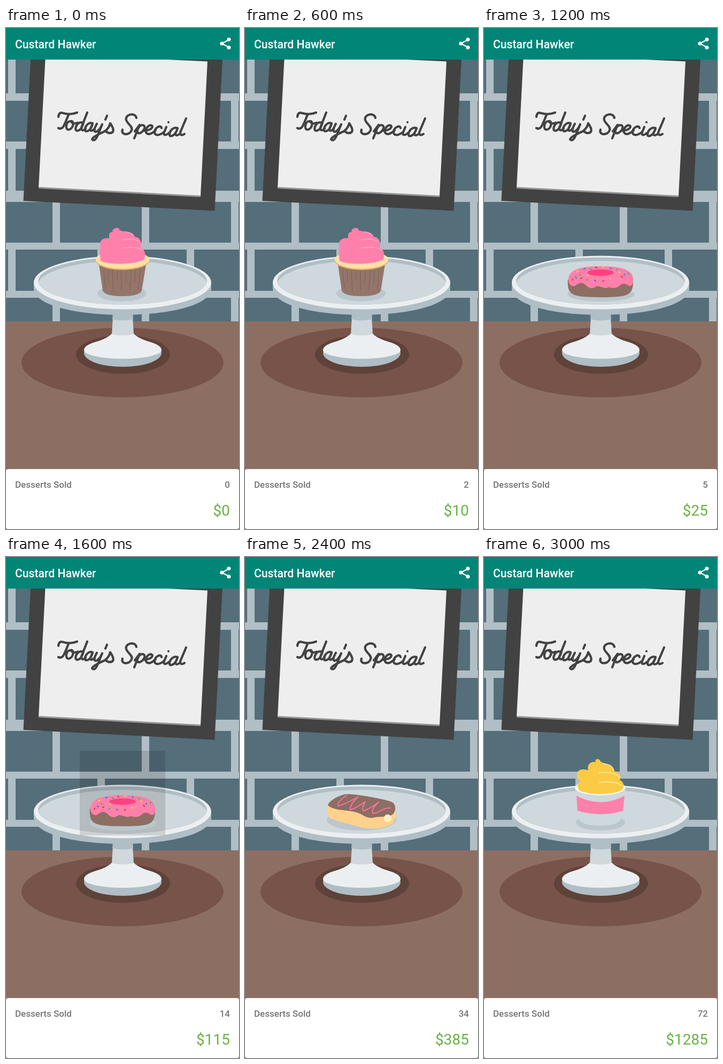
Recreate the animation shown at these times as an HTML page. Size 436 px wide and 936 px high, loop 3200 ms.

```html
<!DOCTYPE html>
<html lang="en">
<head>
<meta charset="utf-8">
<title>Dessert counter</title>
<style>
  html, body { margin: 0; width: 100%; height: 100%; overflow: hidden; }
  svg { display: block; width: 436px; height: 936px; font-family: Roboto, sans-serif; }
  .line { fill: none; stroke-linecap: round; stroke-linejoin: round; }
  .shadow { fill: #bac7cd; }
  .end { text-anchor: end; }
</style>
</head>
<body>
<svg viewBox="0 0 436 936">
  <!-- wall -->
  <path fill="#546e7a" d="M0 59h436v489H0z"/>
  <g id="mortar" fill="#b0bec5"></g>

  <!-- sign -->
  <path fill="#424242" d="M46 59H405L390.500 341.500 32.500 323z"/>
  <path fill="#eee" d="M73.500 59H302L377 62.500 364 315 61 299z"/>
  <path class="line" stroke="#949494" stroke-width="3" d="M62.500 298.500 363 314.500"/>
  <g role="img" aria-label="Today's Special" class="line" stroke="#424242" stroke-width="4.200">
    <path d="M98 166Q99 156 107 159Q120 163 133 158M117 162Q112 175 108 183Q104 190 98 187"/>
    <path d="M121 174C112 174 110 190 117 190C126 189 129 173 121 174Q126 181 134 177"/>
    <path d="M144 177C133 173 126 191 133 192C139 192 143 184 145 177M152 158L141 186Q141 195 149 188"/>
    <path d="M162 178C151 174 144 192 150 193C156 193 160 186 162 179L158 188Q158 196 166 188"/>
    <path d="M170 179Q162 193 168 194Q175 192 180 180L171 202Q166 213 161 208Q162 203 185 193"/>
    <path d="M189 164L186 171M185 193Q193 187 195 178Q204 191 199 195Q193 198 188 194"/>
    <path d="M244 168C242 157 222 161 225 172C227 179 238 184 235 191C232 201 214 201 218 190"/>
    <path d="M241 193L250 181L240 206M247 187C254 177 263 182 258 190C253 197 247 199 245 193"/>
    <path d="M257 192Q273 191 274 184C271 177 259 187 262 195C266 202 275 196 280 191"/>
    <path d="M291 187C290 180 278 186 278 195C279 203 289 200 296 194"/>
    <path d="M300 185L295 197Q297 203 305 196M304 176v.1"/>
    <path d="M321 187C310 183 302 200 308 202C314 202 319 195 321 188L317 197Q318 204 326 197"/>
    <path d="M337 169L326 195Q326 203 334 198"/>
  </g>

  <!-- table and stand -->
  <path fill="#8d6e63" d="M0 548h436v388H0z"/>
  <ellipse cx="218" cy="625" rx="189" ry="65" fill="#775349"/>
  <ellipse cx="219" cy="610" rx="88" ry="36" fill="#5f4239"/>
  <ellipse cx="218.500" cy="607" rx="72.500" ry="26" fill="#b0bec5"/>
  <path fill="#eceff1" d="M198 571Q190 580 166 587Q146 593 146 602A72.500 16 0 0 0 291 602Q291 593 271 587Q247 580 239 571z"/>
  <path fill="#cfd8dc" d="M201 525H236L239 572Q218 577 198 572z"/>
  <path fill="#b0bec5" d="M200 530H237L238 544Q218 549 199 544z"/>
  <path fill="#b0bec5" d="M52 476v12C58 552 378 552 384 488v-12z"/>
  <ellipse cx="218" cy="475.500" rx="166" ry="50" fill="#eceff1"/>
  <clipPath id="dish"><ellipse cx="218" cy="472.500" rx="158" ry="44"/></clipPath>
  <g clip-path="url(#dish)">
    <path fill="#b0bec5" d="M50 420h336v110H50z"/>
    <ellipse cx="218" cy="481" rx="159" ry="46" fill="#cfd8dc"/>
  </g>

  <path id="ripple" fill-opacity=".13" d="M138 362h160v158H138z"/>

  <g class="dessert">
    <ellipse class="shadow" cx="217" cy="496" rx="46" ry="15"/>
    <path fill="#93756a" d="M174 442L181 491Q186 501 217 501Q249 501 254 491L262 442z"/>
    <path class="line" stroke="#7d5f55" d="M183 452l3 34M191 453l1 20M199 453l2 40M208 454v17M216 454v36M225 454l-1 20M234 454l-2 37M242 453l-1 22M251 452l-3 35"/>
    <ellipse cx="218" cy="435" rx="50" ry="17" fill="#e5b779"/>
    <ellipse cx="218" cy="432.500" rx="50" ry="17" fill="#ffe0a3"/>
    <path fill="#ff80ab" d="M176 425C174 413 177 412 177 408C173 397 183 391 193 393C192 382 196 381 200 381C196 375 212 370 212 377C218 382 238 378 241 390C252 391 255 402 251 409C262 415 261 425 259 431C250 443 190 443 177 435z"/>
    <path class="line" stroke="#ffbdd2" d="M222 381Q234 380 238 389M217 396Q241 391 250 400M219 411Q245 407 256 415"/>
  </g>

  <g class="dessert">
    <ellipse class="shadow" cx="219" cy="497" rx="63" ry="14"/>
    <path fill="#8d6e63" d="M157 470C155 500 165 503 218 503C270 503 280 500 279 470z"/>
    <path fill="#ff80ab" d="M158 470C158 450 185 445 218 445C252 445 278 450 279 468C280 480 275 484 270 481C264 476 258 477 253 482C247 487 240 486 234 484C225 488 218 482 211 482C204 488 197 487 191 481C182 472 176 478 170 482C162 483 158 478 158 470z"/>
    <ellipse cx="218" cy="457" rx="25" ry="6" fill="#ff4081"/>
    <g class="line" stroke-width="2.200">
      <path stroke="#3d7fd6" d="M171 465l2 2M187 450l2-1M207 471l2 2M236 448l2 2M262 462l1-2"/>
      <path stroke="#ffd54f" d="M174 455l2-1M194 461l1 2M222 447h2M235 467l2 2M252 456l2 1"/>
      <path stroke="#e53935" d="M165 471l1-2M181 468l2-1M209 447l2 1M222 473l2-1M257 464l2 2"/>
      <path stroke="#56a65a" d="M179 460l1 2M199 450l2 1M192 471l2-1M248 451l2 1M270 458l1 2"/>
    </g>
  </g>

  <g class="dessert">
    <ellipse class="shadow" cx="218" cy="491" rx="65" ry="20"/>
    <path fill="#ffd18c" d="M155 462V481C156 490 165 491 218 505C238 510 268 506 277 497C283 488 282 476 282 466z"/>
    <path fill="#8d6e63" d="M155 464C157 455 178 444 190 443C205 442 260 452 273 457C285 461 282 477 276 481C268 487 250 484 240 487C230 489 222 483 214 479C195 471 170 476 155 464z"/>
    <path class="line" stroke="#ff72a4" stroke-width="1.800" d="M191 445Q172 457 174 465Q185 463 212 448Q196 462 197 472Q207 470 225 457Q218 471 221 474Q234 471 250 458Q236 471 239 479C252 479 256 468 272 469"/>
    <circle cx="267" cy="488" r="7" fill="#fff3c4"/>
    <path class="line" stroke="#ffe29f" stroke-width="1.500" d="M264 490q5 1 6-5"/>
  </g>

  <g class="dessert">
    <ellipse class="shadow" cx="218" cy="496" rx="46" ry="15"/>
    <path fill="#cfd8dc" d="M171 434L178 490Q184 502 217 502Q250 502 256 490L264 434z"/>
    <path fill="#ff80ab" d="M173 446Q218 470 263 446L260 474Q218 487 175 474z"/>
    <ellipse cx="217.500" cy="431" rx="47.500" ry="14" fill="#f7f8f8"/>
    <path fill="#facb43" d="M178 436C174 428 174 422 181 418C171 416 171 398 183 397C188 396 192 398 195 398C192 388 200 381 209 383C207 377 214 376 217 380C220 388 240 383 244 400C255 403 257 412 254 417C262 420 264 430 257 436C240 445 195 445 178 436z"/>
    <path class="line" stroke="#fff0b8" stroke-width="1.300" d="M224 387Q238 386 243 398M215 403Q245 400 254 412M216 421Q248 418 257 427"/>
  </g>

  <!-- app bar and totals -->
  <path fill="#008577" d="M0 0h436v59H0z"/>
  <text x="17" y="37.500" font-size="21.200" font-weight="500" fill="#fff">Custard Hawker</text>
  <path class="line" stroke="#fff" stroke-width="2.200" d="M417 22L404 29 417 36"/>
  <g fill="#fff"><circle cx="417" cy="21.500" r="3.600"/><circle cx="404" cy="29" r="3.600"/><circle cx="417" cy="36.500" r="3.600"/></g>
  <rect y="824" width="436" height="112" rx="4" fill="#fff"/>
  <g font-size="17" font-weight="500" fill="#757575">
    <text x="17" y="859">Desserts Sold</text>
    <text id="sold" class="end" x="419" y="859"></text>
  </g>
  <text id="revenue" class="end" x="419" y="911" font-size="28" fill="#69b244"></text>
</svg>
<script>
  const $ = id => document.getElementById(id);
  const desserts = [...document.querySelectorAll('.dessert')];

  // Horizontal joints, each followed by its course of staggered vertical joints.
  const joints = [[59, 0], [122, 14], [212, 14], [304, 21], [401, 13], [491, 13], [548, 0]];
  let bricks = '';
  joints.forEach(([y, h], row) => {
    bricks += `M0 ${y}h436v${h}H0z`;
    if (row === joints.length - 1) return;
    const start = row % 2 ? 87 : 4;
    for (let x = start; x < 436; x += 167) bricks += `M${x} ${y}h14V${joints[row + 1][0]}h-14z`;
  });
  $('mortar').innerHTML = `<path d="${bricks}"/>`;

  const menu = [{ from: 0, price: 5 }, { from: 5, price: 10 }, { from: 20, price: 15 }, { from: 50, price: 30 }];
  const earned = sold => menu.reduce((sum, { from, price }, i) => {
    const next = menu[i + 1]?.from ?? Infinity;
    return sum + price * Math.max(0, Math.min(sold, next) - from);
  }, 0);

  const STEP = 200, LOOP = 3200;
  const soldAt = [0, 1, 1, 2, 3, 4, 5, 6, 14, 22, 26, 30, 34, 50, 61, 72];
  const pressedSteps = new Set([1, 2, 4, 5, 8]);

  function render(now) {
    const step = Math.floor(now % LOOP / STEP);
    const sold = soldAt[step];
    const current = menu.filter(item => sold >= item.from).length - 1;
    desserts.forEach((g, i) => g.style.display = i === current ? '' : 'none');
    $('ripple').style.display = pressedSteps.has(step) ? '' : 'none';
    $('sold').textContent = sold;
    $('revenue').textContent = '$' + earned(sold);
  }

  const start = performance.now();
  function tick() {
    render(performance.now() - start);
    requestAnimationFrame(tick);
  }
  tick();
</script>
</body>
</html>
```
